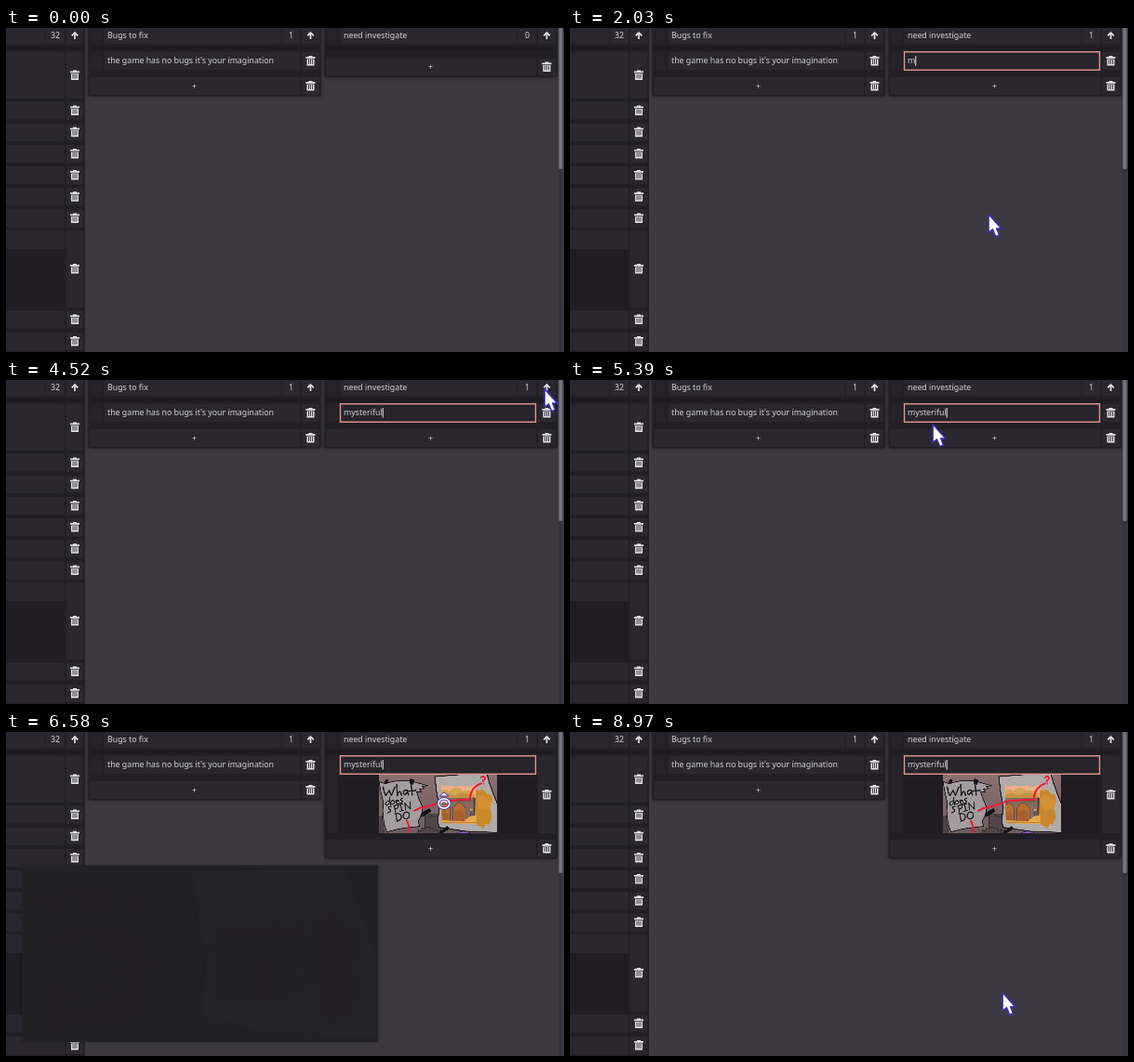
Animation of 600x349 px, one loop 9.91 s. Source, as an HTML page with a canvas:

```html
<!DOCTYPE html>
<html lang="en">
<head>
<meta charset="utf-8">
<title>Task board</title>
<style>
html, body { margin: 0; width: 100%; height: 100%; overflow: hidden; background: #3d3942; }
canvas { display: block; width: 600px; height: 349px; }
</style>
</head>
<body>
<canvas id="stage" width="600" height="349"></canvas>
<script>
const ctx = document.getElementById('stage').getContext('2d');
const LOOP = 9910;
const PANEL = '#211f25', CELL = '#2a2730', DARK = '#201d22', TEXT = '#d3d1d6';

const CARD_ADDED = 1060, IMAGE_ADDED = 5450, PREVIEW_OPEN = 6580, PREVIEW_CLOSE = 8330;

const typed = [
  [2030, 'm'], [2240, 'my'], [2360, 'myst'], [2520, 'myste'], [2610, 'myster'],
  [2700, 'mysteri'], [2850, 'mysterif'], [2970, 'mysterifu'], [3150, 'mysteriful']
];

// time, x, y of the pointer tip
const moves = [
  [30, 601, 257], [200, 400, 225], [360, 206, 130], [500, 330, 55], [700, 452, 36],
  [1060, 452, 36], [1240, 450, 201],
  [3790, 450, 201], [3970, 300, 310], [4160, 72, 210], [4340, 300, 70], [4500, 584, 8], [4700, 420, 64],
  [4790, 420, 64], [4850, 408, 60], [5000, 408, 60], [5110, 348, 38], [5210, 390, 48],
  [5390, 390, 48], [5620, 570, 180], [5850, 520, 275], [6100, 560, 130], [6360, 471, 66],
  [7000, 471, 66], [7140, 330, 190], [7270, 40, 296], [7370, 130, 262], [7480, 263, 254], [7670, 300, 215],
  [7820, 300, 215], [7930, 122, 300], [8050, 420, 315], [8180, 580, 90],
  [8330, 580, 90], [8450, 570, 20], [8610, 496, 260],
  [8850, 496, 260], [8970, 465, 281]
];

const clamp = v => Math.max(0, Math.min(1, v));

function pointerAt(t) {
  if (t < moves[0][0]) return null;
  for (let i = 1; i < moves.length; i++) {
    const [t0, x0, y0] = moves[i - 1], [t1, x1, y1] = moves[i];
    if (t < t1) {
      const k = (t - t0) / (t1 - t0), e = k * k * (3 - 2 * k);
      return [x0 + (x1 - x0) * e, y0 + (y1 - y0) * e];
    }
  }
  return moves[moves.length - 1].slice(1);
}

function box(x, y, w, h, color = CELL) {
  ctx.fillStyle = color;
  ctx.fillRect(x, y, w, h);
}

function cell(x, y, w, h, color = CELL) {
  ctx.fillStyle = color;
  ctx.beginPath();
  ctx.roundRect(x, y, w, h, 1.5);
  ctx.fill();
}

function panel(x, y, w, h) {
  ctx.save();
  ctx.shadowColor = 'rgba(20,17,24,.65)';
  ctx.shadowBlur = 4;
  cell(x, y, w, h, PANEL);
  ctx.restore();
}

function label(s, x, y, align = 'left') {
  ctx.font = '8.8px "Noto Sans", sans-serif';
  ctx.textAlign = align;
  ctx.fillStyle = TEXT;
  ctx.fillText(s, x, y + 3);
}

function shape(d, fill, stroke, width = 1) {
  const p = new Path2D(d);
  if (fill) { ctx.fillStyle = fill; ctx.fill(p); }
  if (stroke) { ctx.strokeStyle = stroke; ctx.lineWidth = width; ctx.stroke(p); }
}

function at(x, y, draw, scale = 1) {
  ctx.save();
  ctx.translate(x, y);
  ctx.scale(scale, scale);
  draw();
  ctx.restore();
}

function trash(x, y) {
  at(x, y, () => {
    shape('M-5 -4.5H-2V-5.5H2V-4.5H5V-2.8H-5ZM-4 -2H4V5H-4Z', '#e4e2e6');
    shape('M-2 -1.5V3.5M0 -1.5V3.5M2 -1.5V3.5', null, CELL, 0.9);
  });
}

function arrowUp(x, y) {
  at(x, y, () => shape('M0 4V-3M-3.3 .3L0 -3L3.3 .3', null, '#e4e2e6', 1.7));
}

function trashCell(x, y, h) {
  cell(x, y, 19, h);
  trash(x + 9.5, y + h / 2);
}

function leftColumn() {
  box(0, 0, 85, 349, PANEL);
  cell(-4, -4, 46, 21);
  cell(43, -4, 20, 21);
  cell(64.5, -4, 19, 21);
  label('32', 53, 8, 'center');
  arrowUp(74, 8);
  box(0, 20, 83, 3, '#1c1a20');
  const row = (y, h) => { cell(-4, y, 67, h); trashCell(64.5, y, h); };
  row(26, 50);
  for (let i = 0; i < 6; i++) row(79.5 + i * 23.2, 19);
  row(218, 83);
  box(0, 238, 63, 63, DARK);
  row(304.5, 19);
  row(328, 19);
}

function column(x, title, count, plusY) {
  panel(x, -6, 250, plusY + 17);
  cell(x + 2, -4, 13, 21, '#25222a');
  cell(x + 17, -4, 190, 21);
  cell(x + 208, -4, 20, 21);
  cell(x + 229.5, -4, 19, 21);
  label(title, x + 20.5, 8);
  label(String(count), x + 218, 8, 'center');
  arrowUp(x + 239, 8);
  box(x + 2, 20, 246, 3, '#1c1a20');
  cell(x + 2, plusY - 9.5, 226, 19);
  label('+', x + 114, plusY, 'center');
  trashCell(x + 229.5, plusY - 9.5, 19);
}

function card(x, h) {
  cell(x + 2, 26, 13, h, '#25222a');
  cell(x + 17, 26, 211, 19);
  trashCell(x + 229.5, 26, h);
}

function editedCard(t, hasImage) {
  card(342.5, hasImage ? 83 : 19);
  if (hasImage) {
    box(357, 46, 214, 63, DARK);
    ctx.drawImage(art, 401, 46, 127, 63);
  }
  box(359, 25.5, 211, 20, '#27242b');
  ctx.strokeStyle = '#df968b';
  ctx.lineWidth = 1.4;
  ctx.strokeRect(359.5, 25.7, 210, 19.6);
  const step = typed.filter(s => s[0] <= t).pop();
  const text = step ? step[1] : '';
  label(text, 363, 35);
  const previewFocused = t > PREVIEW_OPEN + 30 && t < PREVIEW_CLOSE;
  if (!previewFocused) box(363 + ctx.measureText(text).width, 30, 1, 10.5, '#eceaee');
}

function gameView() {
  ctx.save();
  ctx.clip(new Path2D('M220 178L235 183L250 180L268 184L290 180L310 184L326 178L335 192L343 198L352 192L360 198L366 208L381 210L384 232L378 250L382 285L372 306L362 304L357 318L342 310L330 304L222 301Z'));
  const sky = ctx.createLinearGradient(0, 178, 0, 228);
  sky.addColorStop(0, '#f2a987');
  sky.addColorStop(1, '#f2c48c');
  box(220, 177, 166, 142, sky);
  shape('M220 198Q232 188 246 199Q268 176 290 198Q306 190 328 206V230H220Z', '#d4a553');
  shape('M220 211Q240 199 262 213Q288 194 328 217V230H220Z', '#c3923f');
  box(220, 221, 110, 82, '#866b60');
  box(220, 230, 110, 3, '#6b554f');
  shape('M220 293V241Q238 232 248 252V293ZM257 293V254Q277 219 298 254V293Z', '#b96d2f', '#5f4a46', 2);
  shape('M222 293V266Q234 256 244 276V293ZM262 293V266Q278 250 294 268V293Z', '#aa602a');
  box(323, 219, 7, 63, '#4c3c3d');
  shape('M330 196L350 190L386 208V320H328V280Z', '#ca882c');
  shape('M332 224Q340 204 356 214Q368 228 382 224V262Q362 250 348 262Z', '#d29135');
  shape('M220 292L290 294L302 287L311 280L332 275V306H220Z', '#e6aa4e');
  shape('M220 299H330', null, '#bf7e38', 2);
  box(313, 255, 7, 7, '#d8a25c');
  box(312, 262, 8, 8, '#4f5968');
  box(313, 270, 2, 6, '#423b43');
  box(318, 270, 2, 6, '#423b43');
  shape('M286 294Q291 285 296 294Z', '#bf352f');
  ctx.restore();
}

function lettering() {
  const ink = '#17141a';
  shape('M34 185Q36 203 42 213L53 196L60 213Q66 198 71 186M77 178L79 213Q84 194 90 203L93 213M111 196Q99 193 99 204Q102 216 111 201L115 211M123 177L127 211M112 199L139 196', null, ink, 4);
  shape('M54 231Q40 231 41 241Q46 249 55 234M54 219L57 243M64 228Q56 232 59 239Q68 243 70 234Q69 227 63 229M74 233L84 230Q79 223 74 230Q75 242 86 237M96 221Q86 224 91 228Q101 233 89 238', null, ink, 3.2);
  shape('M61 247Q46 247 52 255Q65 261 48 268M69 245L73 266M68 246Q83 239 82 249Q79 255 72 256M84 242L96 239M90 241L93 261M87 263L99 260M105 259L103 237L121 256L120 234', null, ink, 3.2);
  shape('M74 270L78 294M71 271Q91 267 92 281Q91 292 77 295M107 265Q96 270 98 281Q106 293 116 282Q121 265 107 265', null, ink, 3.5);
}

// Corkboard drawing, laid out in preview coordinates
function paintPicture() {
  const wall = ctx.createLinearGradient(0, 146, 0, 332);
  wall.addColorStop(0, '#8b7170');
  wall.addColorStop(1, '#6d5d5e');
  box(20, 146, 379, 187, wall);
  shape('M18 333V282L30 278V292L38 333ZM168 333V270L178 266V273H212L220 333Z', '#514649', '#302a30', 2);
  shape('M144 333L147 323L155 326L159 317L168 319L171 313H181L184 319L194 317L197 325L206 323L210 333Z', '#514649', '#292329', 2);
  ctx.font = 'bold italic 9px "Noto Sans", sans-serif';
  ctx.textAlign = 'left';
  ctx.fillStyle = '#211c22';
  ctx.fillText('..init()', 181, 282);
  shape('M20 168L38 174L75 166L117 165L140 171L158 176L177 181L159 183L166 190L150 192L156 201L141 201L149 225L160 250L157 275L146 295L150 311L120 314L85 319L45 329L36 300L32 262L34 235L26 200Z', '#a39b9d', '#171419', 2.6);
  shape('M199 152L285 145H367L375 174L389 212L400 239V331L300 327L252 320L212 314L209 290L214 250L205 201Z', '#b1aaab', '#171419', 3.2);
  gameView();
  lettering();
  shape('M42 160L52 163L46 176L37 172ZM120 158L134 163L130 179L119 174ZM152 278L158 267L182 253L188 263L160 281ZM211 330L240 310L247 318L220 336Z', '#151217');
  shape('M272 334A20 7 0 0 1 312 334', '#8b57b6', '#392149', 2);
  const red = '#ed1c36';
  shape('M134 261L155 251M159 252L214 236M219 232Q264 226 311 227Q313 206 321 194Q331 180 348 174M110 294L117 312L116 333', null, red, 6);
  shape('M347 156Q351 149 359 153Q364 161 353 164L354 168M355 174L355 175', null, red, 4.5);
}

// Both sizes share one raster of the drawing
const art = document.createElement('canvas');
art.width = 379;
art.height = 187;

function preview(t) {
  const closing = clamp((t - PREVIEW_CLOSE) / 240);
  if (t < PREVIEW_OPEN || closing === 1) return;
  ctx.save();
  ctx.globalAlpha = 1 - closing;
  ctx.shadowColor = 'rgba(15,13,18,.5)';
  ctx.shadowBlur = 3;
  box(18, 143.5, 382, 190.5, '#222126');
  ctx.shadowBlur = 0;
  ctx.globalAlpha = clamp((t - PREVIEW_OPEN) / 240) * (1 - closing);
  ctx.drawImage(art, 20, 146);
  ctx.restore();
}

function pointer(t) {
  const pos = pointerAt(t);
  if (!pos) return;
  const x = Math.round(pos[0]), y = Math.round(pos[1]);
  if (t >= 6300 && t < 7030) {
    at(x, y, () => {
      shape('M-5 3L0 -1L5 3Z', '#fff', '#4437b5', 1);
      const ring = 'M-6 11A6 5.2 0 0 1 6 11A6 5.2 0 0 1 -6 11Z';
      shape(ring, null, '#4437b5', 3.5);
      shape(ring, null, '#fff', 1.8);
      shape('M-3 11A3 2.5 0 0 1 3 11', null, '#fff', 1.4);
    });
  } else {
    at(x - 0.5, y - 1, () => shape('M.5 .5V18.5L4.5 15.5L7.5 22.5L11 21L8.5 14.5H13Z', '#fff', '#3b2fac', 1.5), 1.1);
  }
}

function draw(t) {
  const hasCard = t >= CARD_ADDED, hasImage = t >= IMAGE_ADDED;
  box(0, 0, 600, 349, '#3d3942');
  leftColumn();
  column(88.5, 'Bugs to fix', 1, 62.5);
  card(88.5, 19);
  label("the game has no bugs it's your imagination", 109, 35);
  column(342.5, 'need investigate', hasCard ? 1 : 0, hasImage ? 125.5 : hasCard ? 62.5 : 42);
  if (hasCard) editedCard(t, hasImage);
  box(594, 0, 5, 349, '#37343c');
  cell(594.5, -4, 4, 156, '#77747c');
  preview(t);
  pointer(t);
}

function prepareArt() {
  ctx.save();
  ctx.lineCap = ctx.lineJoin = 'round';
  paintPicture();
  ctx.restore();
  art.getContext('2d').drawImage(ctx.canvas, 20, 146, 379, 187, 0, 0, 379, 187);
}

prepareArt();
const start = performance.now();
function frame() {
  draw((performance.now() - start) % LOOP);
  requestAnimationFrame(frame);
}
draw(0);
requestAnimationFrame(frame);
</script>
</body>
</html>
```
